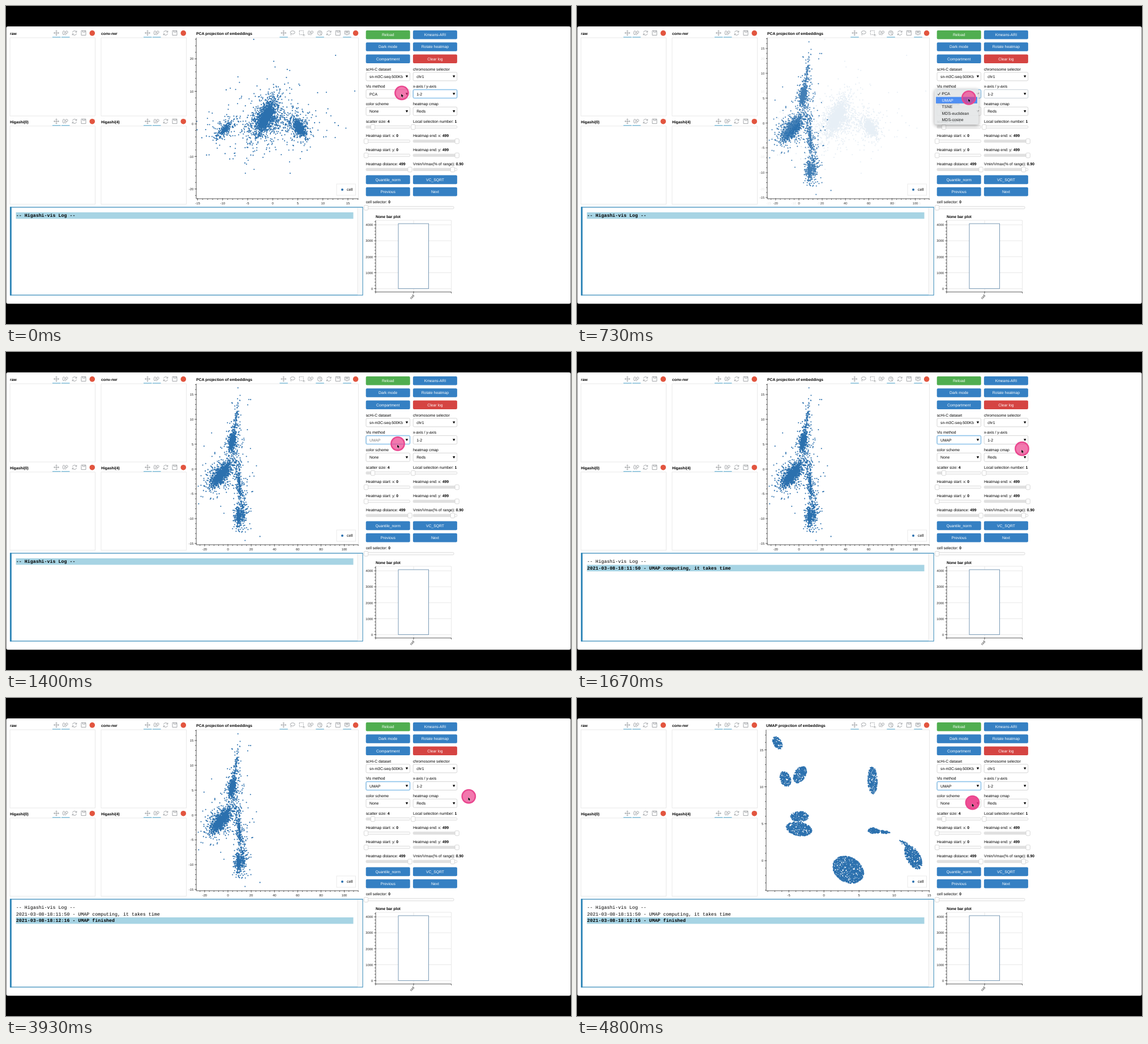
Animation, 998 px wide and 561 px high, one loop 4.87 s. Source, as an HTML page:

```html
<!DOCTYPE html>
<html lang="en">
<head>
<meta charset="utf-8">
<title>Embedding viewer</title>
<style>
html, body { margin: 0; width: 100%; height: 100%; overflow: hidden; background: #000; }
svg { display: block; width: 998px; height: 561px; }
text { font: 6.8px "Liberation Sans", Arial, sans-serif; fill: #000; text-rendering: geometricPrecision; white-space: pre; }
text.tick { font-size: 5.8px; fill: #222; }
text.item { font-size: 7px; }
text.log { font: 8.3px "Liberation Mono", "Courier New", monospace; }
text.b, .b { font-weight: 700; }
text.w { fill: #fff; }
.m { text-anchor: middle; }
.e { text-anchor: end; }
.icon { fill: none; stroke: #9a9ea1; stroke-width: .9; }
.axis { fill: none; stroke: #222; stroke-width: .7; }
.grid { fill: none; stroke: #e3e3e3; stroke-width: .8; }
.dots { fill: none; stroke: #2b70ae; stroke-width: 2.1; stroke-linecap: round; }
.glow { fill: none; stroke: #74b9ea; stroke-width: .9; filter: drop-shadow(0 0 1.2px #66afe999); }
#menu { filter: drop-shadow(0 2px 3px #0006); }
</style>
</head>
<body>
<svg id="stage" viewBox="0 0 998 561"></svg>
<script>
const BLUE = '#3580c3';
const $ = id => document.getElementById(id);
const each = (list, f) => list.map(f).join('');

// ---- markup helpers; text is placed by its vertical middle ----
const text = (x, y, s, cls = '', more = '') =>
  `<text x="${x}" y="${y + 2.4}" class="${cls}" ${more}>${s}</text>`;
const rect = (x, y, w, h, fill, more = '') =>
  `<rect x="${x}" y="${y}" width="${w}" height="${h}" fill="${fill}" ${more}/>`;
const path = (d, cls, more = '') => `<path d="${d}" class="${cls}" ${more}/>`;
const disc = (x, y, r, fill) => `<circle cx="${x}" cy="${y}" r="${r}" fill="${fill}"/>`;

const ICONS = {
  move: 'M-4 0H4M0-4V4M-1.5-3L0-4.5 1.5-3M-1.5 3L0 4.5 1.5 3M-3-1.5L-4.5 0-3 1.5M3-1.5L4.5 0 3 1.5',
  zoom: 'M-4.5-2a1.6 1.6 0 0 1 3.2 0v3.5a1.6 1.6 0 0 1-3.2 0zM.2-1.5a2 2 0 1 0 4 0a2 2 0 1 0-4 0M1.5 .5L0 4',
  lasso: 'M-4-1a4 2.8 0 1 0 8 0a4 2.8 0 1 0-8 0M-2.5 1.2q-2 1.5 0 3',
  box: 'M-4-4H3V3H-4zM2 4h4M4 2v4',
  tap: 'M-4 0a4 4 0 1 0 8 0a4 4 0 1 0-8 0M-1.8 0a2 2 0 0 1 4 0M0 0L3 4',
  reset: 'M3.6-1.5A3.8 3.8 0 0 0-3.6-1M-3.6 1.5A3.8 3.8 0 0 0 3.6 1M3.8-4v2.6H1.4M-3.8 4V1.4H-1.4',
  save: 'M-4-4H4V4H-4zM-1.5-4v2.5h4v-2.5',
  hover: 'M-4-3.5H4V2H1L0 4-1 2H-4zM-2.5-2h5M-2.5-.6h5'
};

function toolbar(x, y, names, active) {
  return each(names.split(' '), (n, i) => {
    const cx = x + i * 16;
    return path(ICONS[n], 'icon', `transform="translate(${cx} ${y})"${n === 'box' ? ' stroke-dasharray="2 1.2"' : ''}`) +
      (active.includes(n) ? rect(cx - 7, y + 6.8, 14.5, 1.1, '#5aacd2') : '');
  }) + disc(x + names.split(' ').length * 16 - .7, y + .3, 4.8, '#e2553f');
}

// zero lies at p0; five minor ticks per labelled step
function axis(vertical, at, lo, hi, p0, step, dv) {
  let d = vertical ? `M${at} ${lo}V${hi}` : `M${lo} ${at}H${hi}`, out = '';
  for (let i = -20; i < 60; i++) {
    const p = p0 + i * step / 5, major = i % 5 === 0;
    if (p < lo || p > hi) continue;
    const len = major ? 3 : 2, inner = major ? 1 : 0;
    d += vertical ? `M${at - len} ${p}H${at + inner}` : `M${p} ${at - inner}V${at + len}`;
    if (!major) continue;
    out += vertical ? text(at - 4.8, p - .2, i / 5 * dv, 'tick e') : text(p, at + 7.9, i / 5 * dv, 'tick m');
  }
  return path(d, 'axis') + out;
}

// ---- scatter data ----
let seed = 7;
function rnd() {
  seed = seed + 0x6D2B79F5 | 0;
  let h = Math.imul(seed ^ seed >>> 15, 1 | seed);
  h = h + Math.imul(h ^ h >>> 7, 61 | h) ^ h;
  return ((h ^ h >>> 14) >>> 0) / 2 ** 32;
}
const gauss = () => Math.sqrt(-2 * Math.log(1 - rnd())) * Math.cos(2 * Math.PI * rnd());

// n points around (x, y); pick() gives each one's offset along and across the tilted long side
function scatter(n, x, y, tilt, pick) {
  const c = Math.cos(tilt * Math.PI / 180), s = Math.sin(tilt * Math.PI / 180);
  let d = '';
  while (n--) {
    const [a, b] = pick(), px = x + a * c - b * s, py = y + a * s + b * c;
    if (px > 337 && px < 621 && py > 58 && py < 338) d += `M${px.toFixed(1)} ${py.toFixed(1)}h0`;
  }
  return d;
}
// dense core with a rounder, sparse halo
const cloud = (n, x, y, along, across, tilt) => scatter(n, x, y, tilt, () => {
  const s = .8 * Math.exp(.45 * gauss());
  return [gauss() * along * s, gauss() * across * s ** 1.6];
});
// evenly filled ellipse
const oval = (n, x, y, along, across, tilt) => scatter(n, x, y, tilt, () => {
  const r = Math.sqrt(rnd()), a = 2 * Math.PI * rnd();
  return [along * r * Math.cos(a), across * r * Math.sin(a)];
});

const first = cloud(1900, 460, 194, 19, 8, -64) + cloud(370, 386, 219, 10, 4.5, -48) +
  cloud(900, 518, 215, 10, 6, 58) + cloud(480, 466, 204, 46, 24, 0);
const second = cloud(700, 400, 157, 10, 4, -78) + cloud(100, 406, 120, 20, 3.5, -80) +
  cloud(1900, 380, 216, 14, 5.5, -52) + cloud(330, 412, 235, 32, 5.5, 84) +
  cloud(450, 411, 290, 9, 3.2, 90) + cloud(100, 419, 287, 18, 5, 95);
const third = oval(170, 354, 79, 12, 7, 60) +
  oval(260, 368, 143, 14, 9, 70) + oval(320, 394, 135, 16, 10, -60) +
  oval(350, 522, 145, 24, 8.5, 88) +
  oval(300, 393, 209, 16, 9, 0) + oval(560, 392, 231, 23, 12, 10) +
  oval(1400, 479, 303, 29, 22, 30) +
  oval(110, 523, 234, 9, 5, 0) + oval(90, 536, 236, 18, 3, 6) +
  oval(560, 594, 281, 23, 12, 60) + oval(40, 579, 257, 11, 3, 30);

function plot(id, method, left, dots, xAxis, yAxis) {
  return `<g id="${id}">` + rect(321, 43, 303, 311, '#fff') +
    text(left, 48.6, method + ' projection of embeddings', 'b') +
    path(`M${left} 56H622.5V340H${left}z`, 'grid') + path(dots, 'dots') +
    axis(false, 340, left, 622.5, ...xAxis) + axis(true, left, 56, 340, ...yAxis) +
    rect(584, 314, 33.5, 20, '#fffffff2', 'stroke="#e5e5e5" stroke-width=".8"') +
    disc(594, 324, 2, '#2b70ae') + text(602, 324, 'cell') + '</g>';
}

// ---- controls: two columns, even rows ----
const colX = i => 636 + i % 2 * 83.2;
const row = i => Math.floor(i / 2);

const buttons = (top, labels) => each(labels, (s, i) => {
  const x = colX(i), y = top + row(i) * 21.25;
  const fill = { Reload: '#50ae50', 'Clear log': '#d54442' }[s] || BLUE;
  return rect(x - .3, y, 78, 15.6, fill, 'rx="2"') + text(x + 38.7, y + 7.8, s, 'w m');
});

const selectY = i => 124.3 + row(i) * 30.65;
const selectBox = (i, more) => rect(colX(i), selectY(i) - 7.4, 77.5, 15, '#fff', 'rx="2" ' + more);
const selects = list => each(list, ([label, value], i) => {
  const x = colX(i), y = selectY(i);
  return text(x - .3, y - 13.2, label) + selectBox(i, 'stroke="#ccc" stroke-width=".8"') +
    text(x + 6, y + .2, value, '', `id="value${i}"`) + path(`M${x + 69.8} ${y - 1.7}h4.4l-2.2 4z`, '');
});
const glow = i => selectBox(i, `id="glow${i}" class="glow"`);

function slider(x, y, label, value, part, width = 77.5) {
  const knob = x + part * width;
  return text(x - .3, y, `${label}: <tspan class="b">${value}</tspan>`) +
    rect(x, y + 8, width, 4.4, '#fafafa', 'rx="1.5" stroke="#d2d2d2" stroke-width=".7"') +
    rect(x, y + 8, knob - x, 4.4, '#e0e0e0', 'rx="1.5"') +
    rect(knob - 3.6, y + 6, 7.2, 8.6, '#fff', 'rx="1.8" stroke="#cfcfcf" stroke-width=".8"');
}
const sliders = list => each(list, (s, i) => slider(colX(i), 203.2 + row(i) * 25, ...s));

const heatmaps = each(['raw', 'conv-rwr', 'Higashi(0)', 'Higashi(4)'], (title, i) => {
  const x = 7 + i % 2 * 161, y = 47.6 + row(i) * 155.8;
  return text(x, y + .8, title, 'b') + rect(x, y + 8.4, 150.5, 138, 'none', 'class="grid"') +
    toolbar(x + 82, y, 'move zoom reset save', 'move zoom');
});

const menuItems = ['PCA', 'UMAP', 'TSNE', 'MDS-euclidean', 'MDS-cosine'];
const menuY = i => 155 + i * 11.45;
const menu = '<g id="menu">' + rect(631.5, 146, 78, 63, '#e3e6e7', 'rx="3.5"') +
  rect(634, 0, 73, 11.4, '#3c83f2', 'id="pick"') +
  each(menuItems, (s, i) => text(644.5, menuY(i), s, 'item', `id="item${i}"`)) +
  path('M637.3 155.3l1.4 2 2.6-4.6', 'axis', 'style="stroke-width:1"') + '</g>';

const logLines = ['-- Higashi-vis Log --',
  '2021-03-08-18:11:50 - UMAP computing, it takes time',
  '2021-03-08-18:12:16 - UMAP finished'];
const logPanel = rect(7.5, 355, 622.5, 155, '#fff', 'stroke="#2c84b6" stroke-width="1.2"') +
  rect(7, 354.5, 2.8, 156, '#2c84b6') + rect(621, 356, 8.4, 153.4, '#fafafa') +
  path('M621 356V509', 'grid') + rect(17.5, 364, 596, 11.4, '#a7d4e4', 'id="bar"') +
  each(logLines, (s, i) => text(17.8, 370 + i * 11.5, s, 'log', `id="log${i}"`));

const barChart = text(653, 372, 'None bar plot', 'b') +
  path('M653 378H786.5V504.5M720 378V504' + each([0, 1, 2, 3, 4], i => `M653 ${498.6 - i * 28.15}H786`), 'grid') +
  rect(693, 384, 53.5, 114.6, '#fff', 'stroke="#6c8fae" stroke-width=".9"') +
  axis(true, 653, 378, 504.5, 498.6, -28.15, 1000) +
  path('M653 507V504.5H786.5V507M720 503.5V507.5', 'axis') +
  text(0, 0, 'cell', 'tick m', 'transform="translate(717 512.8) rotate(-45)"');

const pointer = '<g id="pointer"><circle id="halo" r="11.7" fill="#ec3284" stroke="#e9478f" stroke-width="2.4"/>' +
  '<path d="M-.8 1.6v5.6l1.3-1.2.9 2 .9-.4-.9-1.9h1.8z" stroke="#fff" stroke-width=".5" paint-order="stroke"/></g>';

$('stage').innerHTML = rect(.5, 36, 997, 489.3, '#fff', 'rx="3"') + heatmaps +
  plot('plot1', 'PCA', 336, first, [471.2, 44.25, 5], [208, -57.4, 10]) +
  plot('plot2', 'PCA', 336, second, [392, 41.1, 20], [206.4, -43.8, 5]) +
  plot('plot3', 'UMAP', 334, third, [436.2, 62, 5], [287, -65.2, 5]) +
  toolbar(490.3, 47.6, 'move lasso box zoom tap reset save hover', 'move tap hover') +
  logPanel +
  buttons(42.9, ['Reload', 'Kmeans-ARI', 'Dark mode', 'Rotate heatmap', 'Compartment', 'Clear log']) +
  selects([['scHi-C dataset', 'sn-m3C-seq-500Kb'], ['chromosome selector', 'chr1'],
    ['Vis method', 'PCA'], ['x-axis / y-axis', '1-2'], ['color scheme', 'None'], ['heatmap cmap', 'Reds']]) +
  glow(2) + glow(3) +
  sliders([['scatter size', 4, .155], ['Local selection number', 1, 0],
    ['Heatmap start: x', 0, 0], ['Heatmap end: x', 499, 1],
    ['Heatmap start: y', 0, 0], ['Heatmap end: y', 499, 1],
    ['Heatmap distance', 499, 1], ['Vmin/Vmax(% of range)', '0.90', .9]]) +
  buttons(298.6, ['Quantile_norm', 'VC_SQRT', 'Previous', 'Next']) +
  slider(636, 345.5, 'cell selector', 0, 0, 155) +
  barChart + menu + pointer;

// ---- motion, counted in ticks of 1/15 s ----
const TICKS = 73, LOOP = 4870;
const clamp = v => Math.max(0, Math.min(1, v));
const between = (k, from, to) => clamp((k - from) / (to - from));
const easeOut = u => 1 - (1 - u) ** 2;
const fade = (id, v) => $(id).setAttribute('opacity', v);

// into the menu, away to the right, back to the next select
const home = [699, 153.3];
const moves = [[4, 11, 692, 161.8], [21, 29, 817.3, 173.6], [64, 72, 698.5, 184.6]];
function pointerAt(k) {
  return moves.reduce(([x, y], [from, to, tx, ty]) => {
    const u = easeOut(between(k, from, to));
    return [x + (tx - x) * u, y + (ty - y) * u];
  }, home);
}

function draw(k) {
  const mix = between(k, 3, 12), chosen = k >= 17;
  fade('plot2', mix);
  fade('plot3', k >= 60 ? 1 : 0);
  fade('glow2', mix);
  fade('glow3', 1 - mix);
  fade('menu', chosen ? 1 - between(k, 16, 20) : mix);

  const [x, y] = pointerAt(k), over = y > 158 ? 1 : 0;
  $('pointer').setAttribute('transform', `translate(${x} ${y})`);
  $('halo').setAttribute('fill-opacity', .66 + .2 * between(k, 68, 72));
  $('pick').setAttribute('y', menuY(over) - 6);
  menuItems.forEach((s, i) => $('item' + i).classList.toggle('w', i === over));

  $('value2').textContent = chosen ? 'UMAP' : 'PCA';
  $('value2').style.fill = chosen && k < 23 ? '#777' : '';

  const last = (k >= 23) + (k >= 59);
  $('bar').setAttribute('y', 364 + last * 11.5);
  logLines.forEach((s, i) => {
    fade('log' + i, i <= last ? 1 : 0);
    $('log' + i).classList.toggle('b', i === last);
  });
}

const start = performance.now();
function run() {
  const t = (performance.now() - start) % LOOP;
  draw(Math.min(TICKS - 1, Math.floor((t + 4) * .015)));
  requestAnimationFrame(run);
}
run();
</script>
</body>
</html>
```
